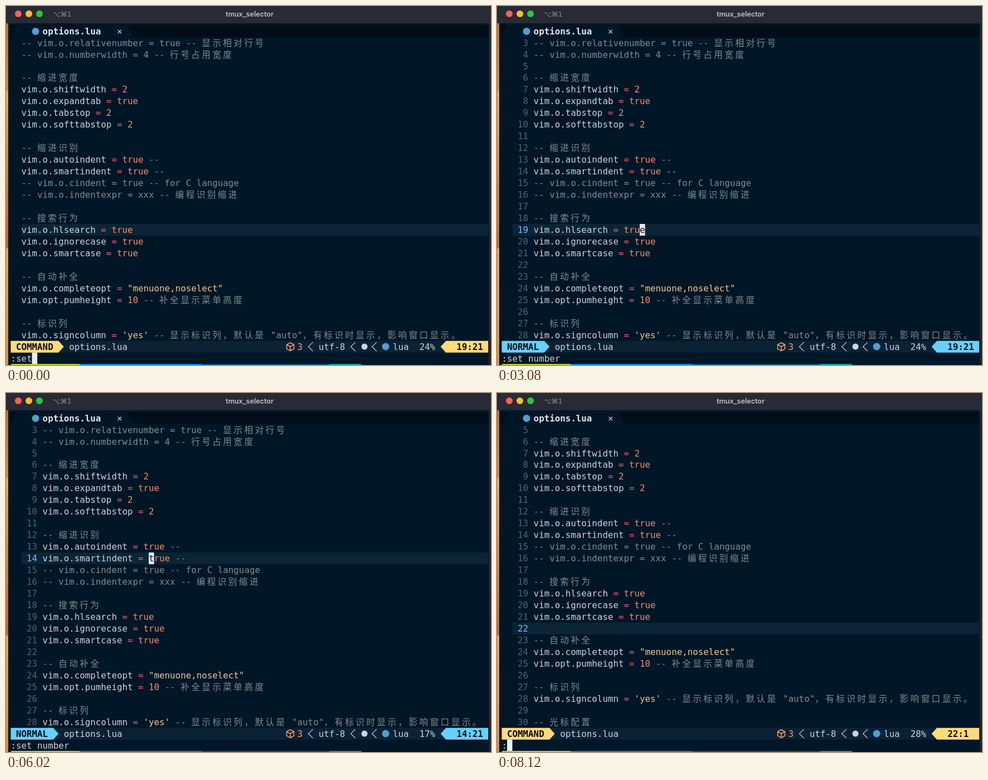
Animation of 870 by 644 pixels, one loop 8260 ms. Source, as an HTML page:

```html
<!DOCTYPE html>
<html lang="zh">
<head>
<meta charset="utf-8">
<title>tmux_selector</title>
<style>
  html, body { margin: 0; width: 100%; height: 100%; overflow: hidden; background: #011627; }
  svg { display: block; width: 870px; height: 644px; }
  text { white-space: pre; font: 15.8px "DejaVu Sans Mono", "Noto Sans CJK SC", "Noto Sans CJK", monospace; }
  .b { font-weight: bold; }
  .cjk { font: 300 15.6px "Noto Sans CJK SC", "Noto Sans CJK", sans-serif; }
  .title { font: 600 12.6px Inter, sans-serif; }
  .keys { font: 12px "DejaVu Sans", sans-serif; }
</style>
</head>
<body>
<svg viewBox="0 0 870 644">
  <defs>
    <linearGradient id="wall" x1="0" y1="0" x2="0" y2="1">
      <stop offset="0" stop-color="#b9722c"/>
      <stop offset=".2" stop-color="#d98a35"/>
      <stop offset=".2" stop-color="#efaa42"/>
      <stop offset=".66" stop-color="#c9602a"/>
      <stop offset=".66" stop-color="#eda63d"/>
      <stop offset="1" stop-color="#d98f38"/>
    </linearGradient>
  </defs>
  <rect width="870" height="644" fill="#011627"/>
  <rect y="30" width="4" height="614" fill="url(#wall)"/>
  <rect x="866" y="30" width="4" height="614" fill="#20242f"/>
  <rect width="870" height="31" fill="#282a36"/>
  <circle cx="22" cy="14" r="6" fill="#ff5f57"/>
  <circle cx="41" cy="14" r="6" fill="#febc2e"/>
  <circle cx="60" cy="14" r="6" fill="#28c840"/>
  <text class="keys" x="84" y="18.5" fill="#8d8f98">⌥⌘1</text>
  <text class="title" x="437" y="18.5" text-anchor="middle" fill="#bfc1c8">tmux_selector</text>
  <path d="M8.5 34.5H18L8.5 55.5ZM218 34.5H865V55.5H227.5Z" fill="#010d18"/>
  <g id="screen"></g>
  <path d="M9 642H132V644H9Z" fill="#b4cf1e"/>
  <path d="M132 642H351V644H132Z" fill="#0a7fe0"/>
  <path d="M351 642H580V644H351Z" fill="#0b4f78"/>
  <path d="M580 642H637V644H580Z" fill="#129c9c"/>
</svg>
<script>
const LOOP = 8260, FIRST = 3, ROWS = 26, TOTAL = 78;
const CELL = 9.52, LEFT = 8.5, PITCH = 20.97, TOP = 34.5, RIGHT = 865;
const C = {
  bg: '#011627', text: '#cdd4e0', dim: '#7c8f8f', num: '#4b6479', cur: '#82b4ff',
  op: '#ff5874', val: '#f78c6c', str: '#ecc994', line: '#0b2436', bar: '#0b2235',
  lua: '#51a0cf', block: '#e9edf0', pkg: '#ff9e64'
};

// buffer contents, starting at line 3
const code = `-- vim.o.relativenumber = true -- 显示相对行号
-- vim.o.numberwidth = 4 -- 行号占用宽度

-- 缩进宽度
vim.o.shiftwidth = 2
vim.o.expandtab = true
vim.o.tabstop = 2
vim.o.softtabstop = 2

-- 缩进识别
vim.o.autoindent = true --
vim.o.smartindent = true --
-- vim.o.cindent = true -- for C language
-- vim.o.indentexpr = xxx -- 编程识别缩进

-- 搜索行为
vim.o.hlsearch = true
vim.o.ignorecase = true
vim.o.smartcase = true

-- 自动补全
vim.o.completeopt = "menuone,noselect"
vim.opt.pumheight = 10 -- 补全显示菜单高度

-- 标识列
vim.o.signcolumn = 'yes' -- 显示标识列，默认是 "auto"，有标识时显示，影响窗口显示。

-- 光标配置`.split('\n');

const ENTER = 1610, COLON = 8050;
const keys = [140, 280, 490, 700, 980, 1120, 1190];
const moves = [[3360, 18], [3570, 17], [3780, 16], [3990, 15], [4200, 14], [4480, 13],
  [4830, 12], [4970, 11], [5390, 12], [5530, 13], [5880, 14], [6090, 15], [6230, 16],
  [6300, 17], [6440, 18], [6650, 19], [7000, 20], [7210, 21], [7420, 22]];

const screen = document.getElementById('screen');
const X = col => LEFT + col * CELL;
const Y = row => TOP + row * PITCH;
const isWide = ch => ch > '\u2e80';
const width = s => [...s].reduce((n, ch) => n + (isWide(ch) ? 2 : 1), 0);
const esc = s => s.replace(/&/g, '&amp;').replace(/</g, '&lt;');

function rect(col, row, cols, fill) {
  return `<rect x="${X(col)}" y="${Y(row)}" width="${cols * CELL}" height="${PITCH}" fill="${fill}"/>`;
}

function circle(cx, cy, r, fill) {
  return `<circle cx="${cx}" cy="${cy}" r="${r}" fill="${fill}"/>`;
}

// text on the character grid, two cells for each wide character
function put(str, col, row, fill, cls = '') {
  let out = '';
  for (const run of str.match(/[\u2e80-\uffff]+|[^\u2e80-\uffff]+/g) || []) {
    const wide = isWide(run[0]), step = wide ? 2 : 1;
    const xs = [...run].map((_, i) => X(col + i * step).toFixed(2)).join(' ');
    out += `<text class="${wide ? 'cjk' : cls}" x="${xs}" y="${Y(row) + 16.1}" fill="${fill}">${esc(run)}</text>`;
    col += run.length * step;
  }
  return out;
}

function colour(tok) {
  if (tok.startsWith('--')) return C.dim;
  if (/^["']/.test(tok)) return C.str;
  if (tok === '=') return C.op;
  return /^(true|\d+)$/.test(tok) ? C.val : C.text;
}

function codeLine(str, col, row) {
  let out = '';
  for (const tok of str.match(/--.*|"[^"]*"|'[^']*'|=|[\w.]+| +/g) || []) {
    if (tok.trim()) out += put(tok, col, row, colour(tok));
    col += width(tok);
  }
  return out;
}

// character under the cursor when the wanted column is 21
function cursorAt(str) {
  const chars = [...str];
  let col = 0, i = 0;
  while (i < chars.length - 1 && col + width(chars[i]) <= 20) col += width(chars[i++]);
  return { col, index: i + 1, ch: chars[i] || ' ' };
}

function chevron(col) {
  const x = X(col), y = Y(27);
  return `<path d="M${x + 9} ${y + 2.5}L${x + 0.7} ${y + 10.5}L${x + 9} ${y + 18.5}" fill="none" stroke="${C.text}" stroke-width="1.2"/>`;
}

function tab() {
  return circle(53, 45.5, 6.5, C.lua) + put('options.lua', 6, 0, '#e4e8ee', 'b') + put('×', 20, 0, C.text);
}

function statusBar(s, index) {
  const row = 27, y = Y(row), mid = y + PITCH / 2, end = y + PITCH;
  const mode = s.command ? 'COMMAND' : 'NORMAL';
  const fill = s.command ? '#ffda7b' : '#65d1ff';
  const n = mode.length + 2;
  const percent = Math.floor(s.line / TOTAL * 100) + '%';
  return `<rect x="${LEFT}" y="${y}" width="${RIGHT - LEFT}" height="${PITCH}" fill="${C.bar}"/>`
    + `<path d="M${LEFT} ${y}H${X(n)}L${X(n + 1)} ${mid}L${X(n)} ${end}H${LEFT}Z`
    + `M${RIGHT} ${y}H${X(82)}L${X(81)} ${mid}L${X(82)} ${end}H${RIGHT}Z" fill="${fill}"/>`
    + put(mode, 1, row, '#0a0a0a', 'b') + put('options.lua', n + 2, row, C.text)
    + `<path d="M510 604L516.5 607.5V614.8L510 618.5L503.5 614.8V607.5ZM503.5 607.5L510 611L516.5 607.5M510 611V618.5" fill="none" stroke="${C.pkg}" stroke-width="1.5" stroke-linejoin="round"/>`
    + put('3', 54, row, C.pkg) + chevron(56) + put('utf-8', 58, row, C.text) + chevron(64)
    + circle(643, 611, 5.5, C.text) + chevron(68) + circle(681, 611, 6.5, C.lua)
    + put('lua', 72, row, C.text) + put(percent, 77, row, C.text)
    + put(s.line + ':' + index, 84, row, '#0a0a0a', 'b');
}

function stateAt(t) {
  const line = moves.reduce((l, m) => t >= m[0] ? m[1] : l, 19);
  const typed = keys.filter(k => t >= k).length;
  return {
    line,
    top: FIRST + Math.max(0, line - 20),
    command: t < ENTER || t >= COLON,
    numbers: t >= ENTER,
    cmd: t >= COLON ? ':' : ':set number'.slice(0, 4 + typed)
  };
}

function draw(s) {
  const start = s.numbers ? 6 : 2, row = s.line - s.top + 1;
  const cur = cursorAt(code[s.line - FIRST]);
  let out = tab() + `<rect x="${X(2)}" y="${Y(row)}" width="${RIGHT - X(2)}" height="${PITCH}" fill="${C.line}"/>`;
  for (let i = 0; i < ROWS; i++) {
    const n = s.top + i;
    if (s.numbers) out += put(String(n).padStart(2), 3, i + 1, n === s.line ? C.cur : C.num);
    out += codeLine(code[n - FIRST], start, i + 1);
  }
  if (!s.command) out += rect(start + cur.col, row, width(cur.ch), C.block) + put(cur.ch, start + cur.col, row, C.bg);
  out += statusBar(s, cur.index) + put(s.cmd, 0, 28, C.text);
  if (s.command) out += rect(s.cmd.length, 28, 1, C.block);
  screen.innerHTML = out;
}

let shown = '';
const begin = performance.now();
function tick() {
  const s = stateAt((performance.now() - begin) % LOOP), key = JSON.stringify(s);
  if (key !== shown) {
    shown = key;
    draw(s);
  }
  requestAnimationFrame(tick);
}
tick();
</script>
</body>
</html>
```
